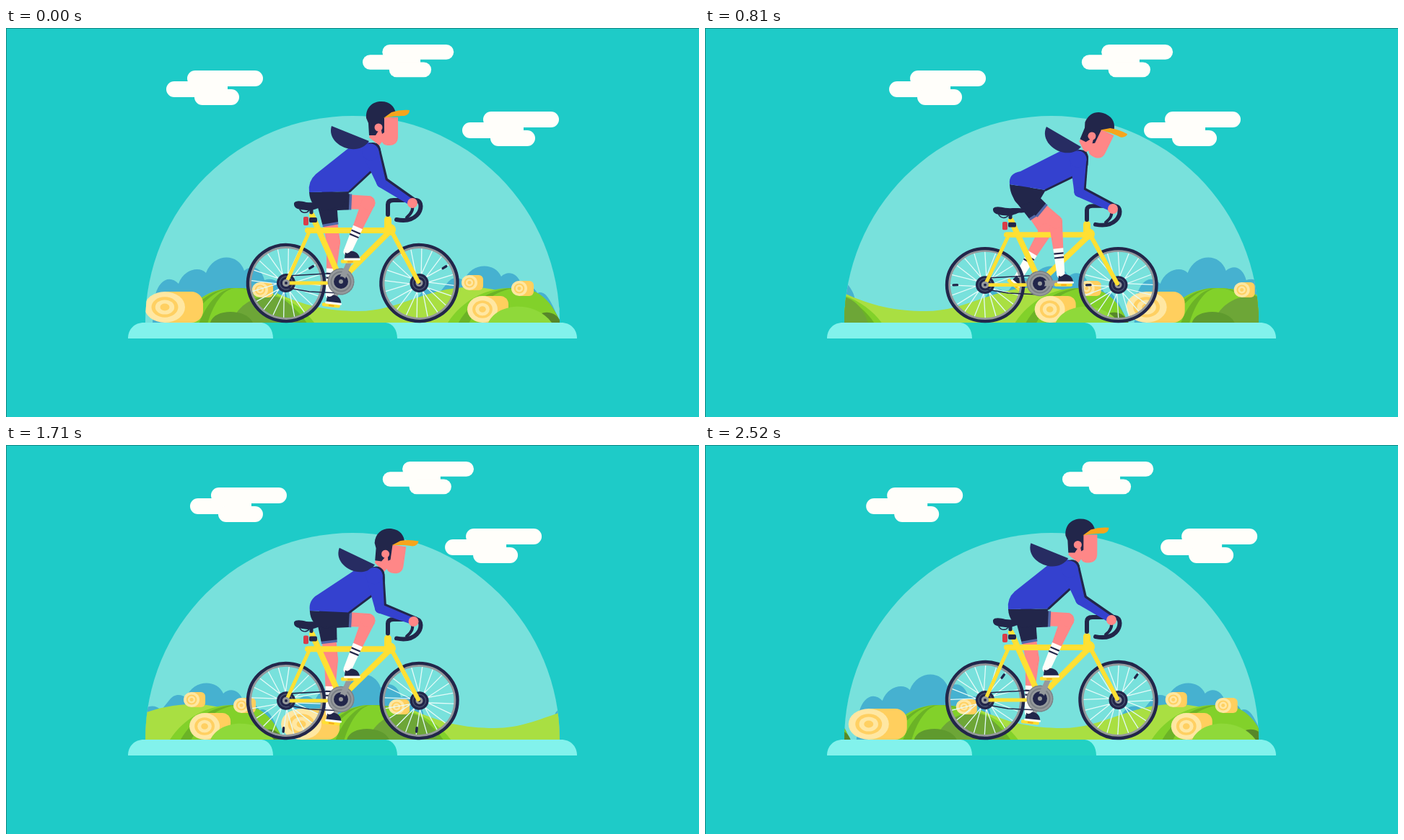
Write an HTML page with a canvas that moves like this. It is 960 by 540 pixels and loops after 2.55 s.

```html
<!DOCTYPE html>
<html lang="en">
<head>
<meta charset="utf-8">
<title>Cyclist</title>
<style>
html, body { margin: 0; width: 100%; height: 100%; overflow: hidden; background: #1ecbc8; }
canvas { display: block; width: 960px; height: 540px; }
</style>
</head>
<body>
<canvas id="stage" width="960" height="540"></canvas>
<script>
const c = document.getElementById('stage').getContext('2d');
const LOOP = 2550, STEP = 30, PERIOD = 574, GROUND = 409, TAU = Math.PI * 2;
const NAVY = '#22264a', BLUE = '#3441cf', SKIN = '#ff8787', YELLOW = '#ffe033',
      GRAY = '#95999c', WHITE = '#fffefa', LIME = '#a9df42', GREEN = '#82d12a',
      DARK = '#6bb326', OLIVE = '#6da637', ORANGE = '#f6a51c';

const rad = d => d * Math.PI / 180;
const clamp = x => Math.max(0, Math.min(1, x));
const smooth = x => (x = clamp(x)) * x * (3 - 2 * x);

function fill(color, d) { c.fillStyle = color; c.fill(new Path2D(d)); }
function line(color, width, d) {
  c.strokeStyle = color;
  c.lineWidth = width;
  c.lineCap = c.lineJoin = 'round';
  c.stroke(new Path2D(d));
}
function oval(color, x, y, rx, ry = rx) {
  c.fillStyle = color;
  c.beginPath();
  c.ellipse(x, y, rx, ry, 0, 0, TAU);
  c.fill();
}
function ring(color, x, y, r, width) {
  c.strokeStyle = color;
  c.lineWidth = width;
  c.beginPath();
  c.arc(x, y, r, 0, TAU);
  c.stroke();
}
function bar(color, x, y, w, h, r) {
  c.fillStyle = color;
  c.beginPath();
  c.roundRect(x, y, w, h, r);
  c.fill();
}
function at(x, y, angle, draw) {
  c.save();
  c.translate(x, y);
  c.rotate(angle);
  draw();
  c.restore();
}
// Tapered limb between two points, rounded where asked
function limb(color, [ax, ay], [bx, by], wa, wb, capA = true, capB = true) {
  at(ax, ay, Math.atan2(by - ay, bx - ax), () => {
    const l = Math.hypot(bx - ax, by - ay);
    fill(color, `M0 ${-wa / 2}L${l} ${-wb / 2}V${wb / 2}L0 ${wa / 2}Z`);
    if (capA) oval(color, 0, 0, wa / 2);
    if (capB) oval(color, l, 0, wb / 2);
  });
}
const mix = ([ax, ay], [bx, by], k) => [ax + (bx - ax) * k, ay + (by - ay) * k];

function cloud(x, y, k) {
  c.save();
  c.translate(x, y);
  c.scale(k, k);
  bar(WHITE, 29, 0, 105, 22, 11);
  bar(WHITE, 0, 15, 85, 22, [11, 0, 0, 11]);
  bar(WHITE, 39, 26, 62, 22, 11);
  c.restore();
}

function bale(x, y, w, h, rx) {
  const cx = x + rx, cy = y + h / 2, ry = h / 2, r = w * .2;
  bar('#ffcf5e', cx, y, w - rx, h, [0, r, r, 0]);
  [['#ffe7a2', 1], ['#ffd062', .66], ['#ffe7a2', .47], ['#ffd062', .23]]
    .forEach(([color, k]) => oval(color, cx, cy, rx * k, ry * k));
}

// Bands made by narrowing the hill towards cx
function stripedHill(d, cx, widths) {
  widths.forEach((k, i) => {
    c.save();
    c.translate(cx, 0);
    c.scale(k, 1);
    c.translate(-cx, 0);
    fill(i % 2 ? DARK : GREEN, d);
    c.restore();
  });
}

function land() {
  fill('#46b1d0', `M203 409L207 370C212 350 227 342 239 355C246 335 268 330 277 340
    C288 312 322 312 330 337C342 327 354 334 358 350C370 346 381 352 388 369L400 409Z`);
  fill('#46b1d0', `M560 409L572 372C580 360 592 360 600 368L612 353C620 344 630 347 634 351
    C644 326 676 324 686 345C696 335 710 342 713 355C726 357 732 360 736 368
    C750 362 758 388 768 409Z`);
  fill(LIME, 'M375 409V368C412 385 445 393 488 393C546 393 580 360 642 360C700 360 740 385 760 409Z');
  stripedHill('M612 409C632 378 665 361 698 361C735 361 760 385 768 409Z', 760, [1, .9, .8]);
  stripedHill('M237 409C255 380 283 361 315 361C365 361 405 379 427 409Z', 322, [1, .9, .78, .64, .5]);
  fill(OLIVE, 'M312 409C322 383 345 372 365 372C388 372 402 390 408 409Z');
  fill('#5f9a2e', 'M283 409C288 389 333 389 342 409Z');
  fill('#57872a', 'M730 409C738 389 762 391 769 409Z');
  bale(631, 343, 30, 21, 11);
  bale(700, 351, 31, 21, 11);
  bale(341, 353, 29, 21, 11);
  bale(639, 372, 57, 37, 21);
  fill('#8fd93a', 'M668 409C682 380 734 379 756 409Z');
  bale(192, 366, 81, 43, 28);
}

function scenery(t) {
  c.fillStyle = '#1ecbc8';
  c.fillRect(0, 0, 960, 540);
  c.fillStyle = '#128985';
  c.fillRect(0, 0, 960, 1);
  c.fillRect(0, 0, 1, 540);
  c.save();
  c.beginPath();
  c.arc(480, GROUND, 287, Math.PI, TAU);
  c.clip();
  c.fillStyle = '#78e1dc';
  c.fillRect(190, 120, 580, 290);
  for (let i = 0; i < 2; i++) {
    c.save();
    c.translate(PERIOD * (i - t / LOOP), 0);
    land();
    c.restore();
  }
  c.restore();
  fill('#82f2ec', 'M169 431C169 418 178 409 191 409H769C782 409 791 418 791 431Z');
  fill('#22d1c3', 'M354 409H526C536 410 542 419 542 431H370C370 419 364 410 354 409Z');
  const drift = t < 1250 ? t / 1250 : (LOOP - t) / 1300;
  cloud(222 + 51 * drift, 59, 1);
  cloud(494 + 43 * drift, 23, .942);
  cloud(632 - 37 * drift, 116, 1);
}

function wheel(x, angle) {
  at(x, 354, angle, () => {
    let d = '';
    for (let i = 0; i < 20; i++) {
      const a = i * TAU / 20, b = a + (i % 2 ? .2 : -.2);
      d += `M${10 * Math.cos(b)} ${10 * Math.sin(b)}L${48 * Math.cos(a)} ${48 * Math.sin(a)}`;
    }
    line('#e4fbf9', 1.3, d);
    ring(GRAY, 0, 0, 49.5, 3);
    ring(NAVY, 0, 0, 53, 4.4);
    line(NAVY, 3.4, 'M38.5 0H44');
    oval(NAVY, 0, 0, 13);
    ring('#4a5370', 0, 0, 9, 1.5);
    oval(GRAY, 0, 0, 5);
    oval(NAVY, 0, 0, 2);
  });
}

function bike(spin) {
  wheel(388, spin);
  wheel(572.5, spin);
  line(NAVY, 1.6, 'M391 344L462 340M392 361L420 366L462 368');
  line(YELLOW, 5, 'M420 283L388 354L444 354');
  line(YELLOW, 6, 'M533 280L571 352');
  line(YELLOW, 8, 'M424 260L463 348');
  line(YELLOW, 8, 'M418 281H533L468 346');
  line(YELLOW, 10, 'M529 266V280');
  oval(YELLOW, 532, 280, 8);
  oval(GRAY, 388, 354, 5);
  oval(NAVY, 388, 354, 2);
  line(NAVY, 1.5, 'M407 252C411 258 417 257 420 253');
  line(NAVY, 5, 'M423 251V256');
  fill(NAVY, 'M399 243C401 239 409 240 416 242C425 243 434 241 446 244C450 248 442 249 435 249C427 252 423 254 416 253C406 252 398 251 399 243Z');
  bar(NAVY, 420, 263, 11, 7, 2);
  bar('#d93c48', 412, 262, 7, 12, 2);
  line(NAVY, 6, 'M529 259V245Q529 239 537 239H568C577 240 576 253 569 260C562 267 551 268 541 266');
  line(NAVY, 4, 'M562 244C566 253 560 259 555 263');
  at(464, 352, 0, () => {
    c.setLineDash([2, 1.4]);
    ring('#7b8085', 0, 0, 17.5, 2);
    c.setLineDash([]);
    oval(GRAY, 0, 0, 17);
    ring('#7b8085', 0, 0, 13.5, 2);
    oval(NAVY, 0, 0, 10);
  });
}

// Two-bone leg with the knee bending forward
function knee([hx, hy], [ax, ay], upper, lower) {
  const d = Math.min(Math.hypot(ax - hx, ay - hy), upper + lower - .01);
  const bend = Math.acos((upper ** 2 + d ** 2 - lower ** 2) / (2 * upper * d));
  const a = Math.atan2(ay - hy, ax - hx) - bend;
  return [hx + upper * Math.cos(a), hy + upper * Math.sin(a)];
}

function leg(hip, axle, angle) {
  const px = axle[0] + 33 * Math.cos(angle), py = axle[1] + 33 * Math.sin(angle);
  const tilt = rad(40) * Math.max(0, -Math.cos(angle)) ** 2;
  const cs = Math.cos(tilt), sn = Math.sin(tilt);
  const ankle = [px - 4 * cs + 11 * sn, py - 4 * sn - 11 * cs];
  const k = knee(hip, ankle, 58, 74);

  limb(GRAY, axle, [px, py], 8, 7);
  limb(SKIN, hip, k, 21, 19);
  limb(SKIN, k, mix(k, ankle, .6), 19, 13, true, false);
  limb(WHITE, mix(k, ankle, .5), ankle, 14, 11, false);
  for (const s of [.58, .66]) limb(NAVY, mix(k, ankle, s), mix(k, ankle, s + .03), 13.5, 13, false, false);
  limb('#5268a8', mix(hip, k, .45), mix(hip, k, .6), 22, 22, false, false);
  limb(NAVY, hip, mix(hip, k, .54), 28, 22, true, false);
  at(px, py, tilt, () => {
    bar(YELLOW, -13, 0, 25, 5, 2);
    bar(ORANGE, -4, 2, 8, 2, 1);
    fill(NAVY, 'M-8 -1L-7 -10Q-4 -7 1 -12C8 -12 13 -7 13 -1Z');
    bar(WHITE, -9, -2, 23, 3, 1.5);
  });
}

function head(x, y, tilt) {
  at(x, y, rad(tilt), () => {
    fill(SKIN, 'M4 -14H27V13C27 22 21 25 15 25C9 25 6 23 5 20L1 25L-13 14L-10 0Z');
    fill(NAVY, 'M-13 11L-14 -6L-17 -13C-18 -28 -8 -36 4 -36C16 -36 22 -29 24 -20L8 -13V7L5 9L3 0L-4 11Z');
    oval(SKIN, 0, 0, 5.5);
    fill(ORANGE, 'M7 -13L18 -21Q30 -25 43 -24Q43 -18 36 -16C25 -16 18 -15 7 -13Z');
  });
}

// Half leaf hanging below the line from tip to end
function hood([ax, ay], [bx, by]) {
  at(ax, ay, Math.atan2(by - ay, bx - ax), () => {
    const l = Math.hypot(bx - ax, by - ay);
    fill('#272c62', `M0 0C2 27 ${l - 6} 29 ${l} 0Z`);
  });
}

// Each point: upright, pedalling hard, coasting low
const POSE = {
  hip: [[444, 240], [441, 232], [444, 241]],
  tail: [[420, 228], [422, 217], [422, 233]],
  belly: [[476, 227], [472, 225], [475, 241]],
  chest: [[505, 200], [511, 206], [508, 224]],
  front: [[518, 181], [529, 190], [531, 202]],
  throat: [[514, 161], [527, 172], [529, 187]],
  nape: [[488, 156], [506, 164], [505, 181]],
  back: [[429, 203], [437, 199], [437, 214]],
  shoulder: [[505, 172], [517, 182], [518, 196]],
  elbow: [[520, 215], [518, 228], [514, 245]],
  hand: [[563, 243], [565, 251], [567, 248]],
  hoodTip: [[451, 136], [473, 137], [478, 153]],
  hoodEnd: [[503, 157], [521, 165], [523, 180]],
  ear: [[516, 138], [536, 150], [540, 171]],
  tilt: [[0], [26], [20]]
};

function render(t) {
  const push = smooth(t / 300) * smooth((1350 - t) / 300);
  const dip = smooth((t - 1350) / 830) * smooth((LOOP - t) / 420);
  const squash = 1 - .047 * push - .043 * dip;
  const crank = rad(293 + 720 * clamp((t - 30) / 1320));
  const axle = [464, GROUND - 57 * squash];
  const p = {};
  for (const key in POSE) {
    const [u, v, w] = POSE[key];
    p[key] = u.map((n, i) => n + push * (v[i] - n) + dip * (w[i] - n));
  }

  scenery(t);
  leg(p.hip, axle, crank + Math.PI);
  c.save();
  c.translate(0, GROUND);
  c.scale(1, squash);
  c.translate(0, -GROUND);
  bike(rad(328) + 5 * TAU * t / LOOP);
  c.restore();

  leg(p.hip, axle, crank);
  oval(NAVY, ...axle, 7);
  oval(GRAY, ...axle, 3);
  const [hx, hy] = p.hip, [tx, ty] = p.tail, [fx, fy] = p.front;
  fill(NAVY, `M${p.tail}L${p.belly}L${hx + 22} ${hy + 8}L${hx - 4} ${hy + 13}Q${tx + 1} ${ty + 20} ${p.tail}Z`);
  fill(BLUE, `M${p.tail}Q${tx - 2} ${ty - 15} ${p.back}L${p.nape}L${p.throat}Q${fx + 1} ${fy - 10} ${p.front}L${p.chest}L${p.belly}Z`);
  line(NAVY, 3, `M${p.belly}L${p.chest}`);
  line(NAVY, 3, `M${p.throat}Q${fx + 1} ${fy - 10} ${p.front}`);
  head(...p.ear, p.tilt[0]);
  hood(p.hoodTip, p.hoodEnd);

  const shade = ([x, y]) => [x + 3, y - 2];
  limb(NAVY, shade(p.shoulder), shade(p.elbow), 22, 13);
  limb(NAVY, shade(p.elbow), shade(p.hand), 13, 9);
  limb(BLUE, p.shoulder, p.elbow, 23, 13);
  limb(BLUE, p.elbow, p.hand, 13, 9);
  oval(SKIN, ...p.hand, 7);
}

function tick(now) {
  render(Math.floor((now % LOOP) / STEP) * STEP);
  requestAnimationFrame(tick);
}
render(0);
requestAnimationFrame(tick);
</script>
</body>
</html>
```
